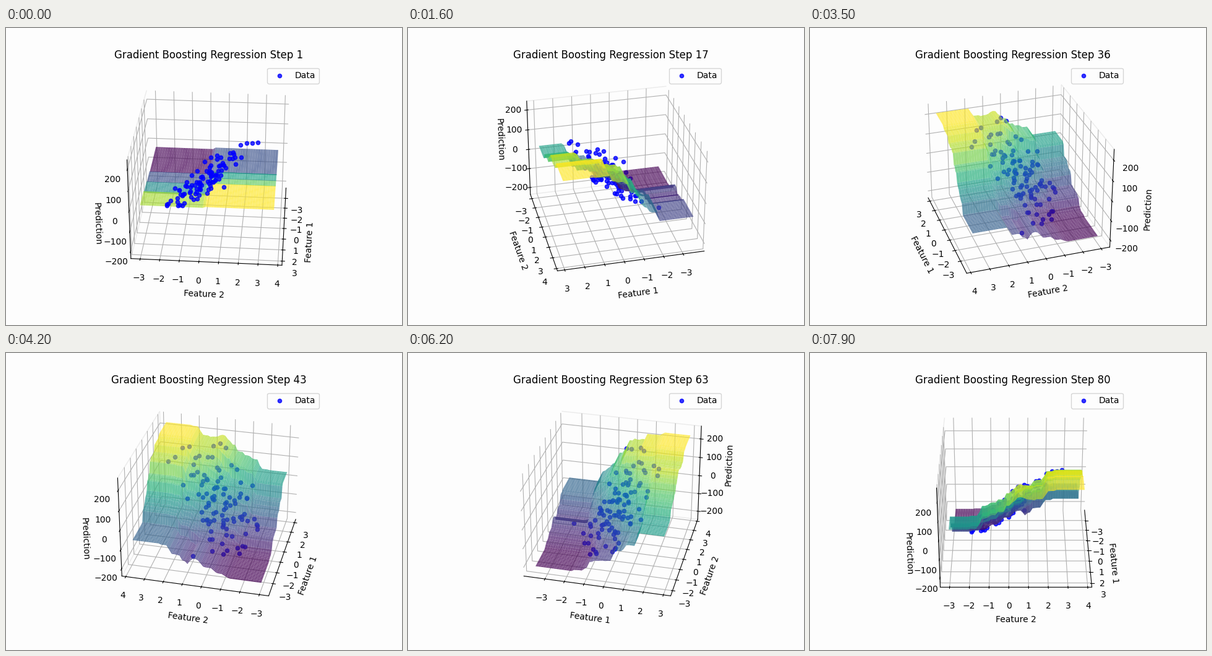
A matplotlib script for the animation above (8000 ms loop, 640 by 480 pixels).

```python
import numpy as np
import matplotlib.pyplot as plt
from matplotlib.animation import FuncAnimation

STEPS = 80
LEARNING_RATE = 0.1
MAX_DEPTH = 3
GRID = 50

plt.rcParams.update({
    "font.family": "DejaVu Sans",
    "figure.facecolor": "#fdfdfd",
    "axes.facecolor": "#fdfdfd",
})


def make_data(samples=100, noise=0.1):
    """Noisy linear target over two normally distributed features."""
    rng = np.random.RandomState(42)
    features = rng.standard_normal((samples, 2))
    weights = 100 * rng.uniform(size=2)
    return features, features @ weights + rng.normal(scale=noise, size=samples)


def best_split(features, target):
    """Feature and threshold with the largest drop in squared error."""
    n = len(target)
    left_n = np.arange(1, n)
    best_gain, best = 0, None
    for column in range(features.shape[1]):
        order = np.argsort(features[:, column])
        values = features[order, column]
        sums = np.cumsum(target[order])
        left, right = sums[:-1], sums[-1] - sums[:-1]
        gain = (left / left_n - right / (n - left_n)) ** 2 * left_n * (n - left_n)
        k = np.argmax(gain)
        if gain[k] > best_gain * (1 + 1e-9):
            best_gain = gain[k]
            best = column, (values[k] + values[k + 1]) / 2
    return best


def tree_predict(features, target, queries, depth=MAX_DEPTH):
    """Fit a regression tree and evaluate it at the query points."""
    split = best_split(features, target) if depth and len(target) > 1 else None
    if split is None:
        return np.full(len(queries), target.mean())
    column, threshold = split
    result = np.empty(len(queries))
    below = features[:, column] <= threshold
    query_below = queries[:, column] <= threshold
    for rows, places in ((below, query_below), (~below, ~query_below)):
        result[places] = tree_predict(features[rows], target[rows],
                                      queries[places], depth - 1)
    return result


def boost(features, target, queries):
    """Prediction at the query points after each boosting step."""
    everywhere = np.vstack([features, queries])
    total = np.full(len(everywhere), target.mean())
    stages = []
    for _ in range(STEPS):
        residual = target - total[:len(target)]
        total = total + LEARNING_RATE * tree_predict(features, residual, everywhere)
        stages.append(total[len(target):])
    return stages


def padded(low, high):
    """Axis limits: a 5% margin, then 1/48 of the widened range."""
    pad = (high - low) * (0.05 + 1.1 / 48)
    return low - pad, high + pad


X, y = make_data()
lows, highs = X.min(axis=0) - 1, X.max(axis=0) + 1
xx, yy = np.meshgrid(*(np.linspace(lo, hi, GRID) for lo, hi in zip(lows, highs)))
surfaces = [stage.reshape(xx.shape)
            for stage in boost(X, y, np.column_stack([xx.ravel(), yy.ravel()]))]

fig = plt.figure(figsize=(6.4, 4.8), dpi=100)
ax = fig.add_subplot(projection="3d")


def draw(frame):
    step = frame + 1
    zz = surfaces[frame]
    ax.clear()
    ax.scatter(X[:, 0], X[:, 1], y, color="blue", alpha=0.8,
               depthshade=False, label="Data")
    ax.plot_surface(xx, yy, zz, cmap="viridis", alpha=0.7)

    ax.set_xticks(range(-3, 4))
    ax.set_yticks(range(-3, 5))
    ax.set_zticks(range(-200, 201, 100))
    ax.set_xlim(*padded(lows[0], highs[0]))
    ax.set_ylim(*padded(lows[1], highs[1]))
    ax.set_zlim(*padded(min(y.min(), zz.min()), max(y.max(), zz.max())))
    for axis, edge in ((ax.xaxis, "none"), (ax.yaxis, "#ebebeb"), (ax.zaxis, "none")):
        axis.pane.set(alpha=None, facecolor="none", edgecolor=edge)

    ax.set_xlabel("Feature 1")
    ax.set_ylabel("Feature 2")
    ax.set_zlabel("Prediction")
    ax.set_title(f"Gradient Boosting Regression Step {step}")
    ax.legend(loc="upper right")
    ax.view_init(elev=30, azim=step * 360 / STEPS)
    return []


anim = FuncAnimation(fig, draw, frames=STEPS, init_func=lambda: [],
                     interval=100, repeat=True, repeat_delay=0)
plt.show()
```
